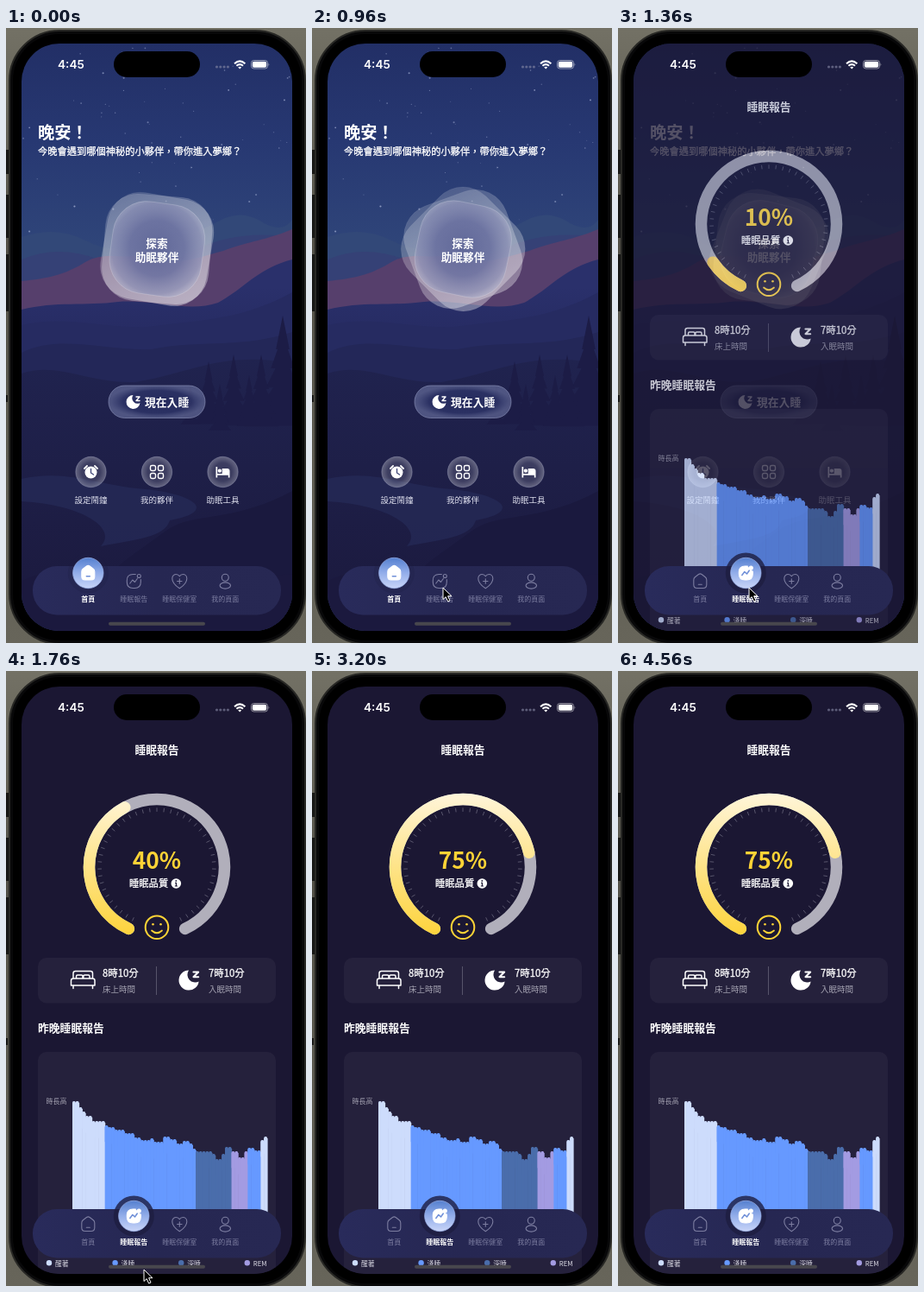
Write an HTML page that moves like this. It is 348 px wide and 712 px high and loops after 4.64 s.

```html
<!DOCTYPE html>
<html lang="zh-Hant">
<head>
<meta charset="utf-8">
<title>Sleep app</title>
<style>
html, body { margin: 0; width: 100%; height: 100%; overflow: hidden; background: #5c5a4f; }
svg { display: block; width: 348px; height: 712px; font-family: "Noto Sans CJK TC", "Noto Sans CJK JP", "Noto Sans", sans-serif; }
.line { fill: none; stroke-linecap: round; stroke-linejoin: round; }
.mid { stroke: #fff; stroke-width: .3; }
</style>
</head>
<body>
<svg viewBox="0 0 348 712" xmlns="http://www.w3.org/2000/svg">
<defs>
  <clipPath id="screen"><rect x="18" y="18" width="314" height="680" rx="44"/></clipPath>
  <linearGradient id="wall" x1="0" y1="0" x2="0" y2="1">
    <stop offset="0" stop-color="#737165"/><stop offset=".35" stop-color="#514f46"/><stop offset="1" stop-color="#67655a"/>
  </linearGradient>
  <linearGradient id="sky" gradientUnits="userSpaceOnUse" x1="0" y1="18" x2="0" y2="300">
    <stop offset="0" stop-color="#222f66"/><stop offset=".4" stop-color="#273872"/><stop offset="1" stop-color="#324a7c"/>
  </linearGradient>
  <linearGradient id="hill" gradientUnits="userSpaceOnUse" x1="0" y1="300" x2="0" y2="470">
    <stop offset="0" stop-color="#2a306b"/><stop offset="1" stop-color="#1f2252"/>
  </linearGradient>
  <linearGradient id="valley" gradientUnits="userSpaceOnUse" x1="0" y1="380" x2="0" y2="698">
    <stop offset="0" stop-color="#20234f"/><stop offset="1" stop-color="#1b193d"/>
  </linearGradient>
  <linearGradient id="petal" gradientUnits="userSpaceOnUse" x1="140" y1="188" x2="205" y2="326">
    <stop offset="0" stop-color="#fff" stop-opacity=".16"/><stop offset="1" stop-color="#fff" stop-opacity=".36"/>
  </linearGradient>
  <radialGradient id="core" gradientUnits="userSpaceOnUse" cx="175" cy="255" r="64">
    <stop offset="0" stop-color="#5d6496" stop-opacity=".92"/><stop offset=".5" stop-color="#696f9f" stop-opacity=".85"/>
    <stop offset=".82" stop-color="#8a8eb4" stop-opacity=".7"/><stop offset="1" stop-color="#bfc1d6" stop-opacity=".5"/>
  </radialGradient>
  <radialGradient id="glass">
    <stop offset="0" stop-color="#fff" stop-opacity=".1"/><stop offset=".6" stop-color="#fff" stop-opacity=".14"/><stop offset="1" stop-color="#fff" stop-opacity=".32"/>
  </radialGradient>
  <radialGradient id="pill">
    <stop offset="0" stop-color="#252b5f" stop-opacity=".85"/><stop offset=".7" stop-color="#2e3569" stop-opacity=".8"/><stop offset="1" stop-color="#69719f" stop-opacity=".65"/>
  </radialGradient>
  <linearGradient id="orb" x1="0" y1="0" x2="0" y2="1">
    <stop offset="0" stop-color="#5580d0"/><stop offset=".5" stop-color="#93aeea"/><stop offset="1" stop-color="#c9d5f8"/>
  </linearGradient>
  <linearGradient id="gold" gradientUnits="userSpaceOnUse" x1="0" y1="142" x2="0" y2="306">
    <stop offset="0" stop-color="#fff5d9"/><stop offset="1" stop-color="#fdd33c"/>
  </linearGradient>
  <linearGradient id="bar" x1="0" y1="0" x2="1" y2="0">
    <stop offset="0" stop-color="#292b5b"/><stop offset=".5" stop-color="#262752"/><stop offset="1" stop-color="#272853"/>
  </linearGradient>
  <path id="moon" d="M0 -8A8 8 0 1 0 8 1A6.2 6.2 0 0 1 0 -8Z"/>
  <path id="zed" class="line" d="M0 0H4L0 4.5H4"/>
</defs>

<rect width="348" height="712" fill="url(#wall)"/>
<g fill="#171715"><rect y="141" width="4" height="28"/><rect y="193" width="4" height="50"/><rect y="262" width="4" height="66"/><rect y="425" width="2" height="8"/></g>
<rect x="4" y="3" width="343" height="710" rx="58" fill="#080809" stroke="#282825" stroke-width="2"/>
<rect x="8" y="7" width="335" height="702" rx="54"/>

<g clip-path="url(#screen)">
  <g id="home">
    <rect x="18" y="18" width="314" height="680" fill="url(#sky)"/>
    <g id="stars" fill="#cdd6f4"></g>
    <path d="M18 242Q58 228 92 246T160 248Q210 244 246 224Q272 209 296 224T332 222V330H18Z" fill="#324878"/>
    <path d="M18 268Q60 250 108 268T205 264Q260 232 332 242V340H18Z" fill="#354176"/>
    <path d="M18 293C48 290 68 286 92 271C112 260 128 266 150 264C188 279 222 266 252 258C280 247 298 247 332 233V290L250 330L18 330Z" fill="#563f6c"/>
    <path d="M18 326C58 316 92 322 130 317C172 314 212 330 246 318C276 302 292 278 332 268V480H18Z" fill="url(#hill)"/>
    <path d="M18 344C70 332 110 348 165 346C220 338 270 340 332 306V480H18Z" fill="#262b61"/>
    <path d="M18 376C60 354 116 374 168 372C226 360 270 372 332 352V520H18Z" fill="#232758"/>
    <path d="M18 400C60 386 96 412 150 410C220 398 250 374 332 388V698H18Z" fill="url(#valley)"/>
    <path d="M18 522C70 510 108 530 162 534C220 540 246 560 190 570C184 590 150 592 110 600C130 580 90 552 18 548Z" fill="#272d5c" opacity=".6"/>
    <g id="trees" fill="#1c1c46"></g>
    <path d="M186 582C214 560 262 574 332 536V698H60C100 640 144 612 186 582Z" fill="#1a193e"/>
    <path d="M18 640C80 612 130 650 332 632V698H18Z" fill="#1b193e"/>
    <g fill="#fff">
      <text x="37" y="128" font-size="19.3" font-weight="700">晚安！</text>
      <text class="mid" x="37" y="146.5" font-size="11.25">今晚會遇到哪個神秘的小夥伴，帶你進入夢鄉？</text>
    </g>
    <g id="blob"></g>
    <g fill="#fff" font-size="12.7" font-weight="700" text-anchor="middle"><text x="175" y="253.5">探索</text><text x="175" y="269.7">助眠夥伴</text></g>
    <rect x="119" y="414" width="112" height="37.5" rx="18.7" fill="url(#pill)" stroke="#8f97bd" stroke-opacity=".6"/>
    <use href="#moon" x="147.5" y="433" fill="#fff"/>
    <use href="#zed" x="151" y="427" stroke="#fff" stroke-width="1.4"/>
    <text x="161" y="437.8" font-size="12.8" font-weight="700" fill="#fff">現在入睡</text>
    <g id="tools"></g>
    <g transform="translate(98.5 514.5)">
      <circle r="7" fill="#fff"/><path class="line" d="M0 -4V.5L3 2.5" stroke="#454b7c" stroke-width="1.4"/>
      <path class="line" d="M-7.5 -4.5L-4.5 -7.5M7.5 -4.5L4.5 -7.5" stroke="#fff" stroke-width="1.8"/>
    </g>
    <g transform="translate(175 514)" class="line" stroke="#fff" stroke-width="1.4">
      <rect x="-7.5" y="-7.5" width="6" height="6" rx="1.7"/><rect x="1.5" y="-7.5" width="6" height="6" rx="1.7"/>
      <rect x="-7.5" y="1.5" width="6" height="6" rx="1.7"/><rect x="1.5" y="1.5" width="6" height="6" rx="1.7"/>
    </g>
    <path transform="translate(251.5 514)" d="M-8 -6H-6.3V2H-.8V-4H5Q8 -4 8 -1V6.5H6.3V3.8H-6.3V6.5H-8ZM-3.6 -3.6A2.2 2.2 0 1 1 -3.6 .8A2.2 2.2 0 1 1 -3.6 -3.6Z" fill="#fff"/>
  </g>

  <g id="report">
    <rect x="18" y="18" width="314" height="680" fill="#1b1733"/>
    <text x="175" y="96.3" font-size="12.8" font-weight="700" fill="#fff" text-anchor="middle">睡眠報告</text>
    <path id="track" class="line" stroke="#b1afbb" stroke-width="13.5"/>
    <path id="arc" class="line" stroke="url(#gold)" stroke-width="13.5"/>
    <path id="ticks" class="line" stroke="#69667c" stroke-width=".8"/>
    <text id="pct" x="175" y="229" font-size="26.3" font-weight="700" fill="#fdd336" text-anchor="middle"></text>
    <text class="mid" x="143" y="250.3" font-size="11.3" fill="#fff">睡眠品質</text>
    <circle cx="197.3" cy="246" r="5.8" fill="#fff"/>
    <path d="M196 244.8H198V248.6H199V249.6H195.8V248.6H196.8V245.8H196Z" fill="#1b1733"/><circle cx="197.3" cy="242.9" r=".9" fill="#1b1733"/>
    <g class="line" stroke="#fdd336" stroke-width="2"><circle cx="175" cy="296.7" r="13.3"/><path d="M169 300.5Q175 306 181 300.5" stroke-width="1.7"/></g>
    <circle cx="170.5" cy="293.3" r="1.3" fill="#fdd336"/><circle cx="179.5" cy="293.3" r="1.3" fill="#fdd336"/>

    <g fill="#25213c"><rect x="37" y="332" width="276" height="52.5" rx="10"/><rect x="37" y="441" width="276" height="280" rx="10"/></g>
    <path d="M174.5 342V375" stroke="#57546b"/>
    <path class="line" d="M78 356V350Q78 347.5 80.5 347.5H98Q100.5 347.5 100.5 350V356M81.5 356V353.5Q81.5 352 83 352H87.5Q89 352 89 353.5V356M89.8 356V353.5Q89.8 352 91.3 352H95.5Q97 352 97 353.5V356M75.5 364V358.5Q75.5 356 78 356H100.5Q103 356 103 358.5V364ZM78 364V367.5M100.5 364V367.5" stroke="#fff" stroke-width="1.5"/>
    <use href="#moon" transform="translate(212 358) scale(1.45)" fill="#fff"/>
    <use href="#zed" transform="translate(217.5 348.5) scale(1.4 1.25)" stroke="#fff" stroke-width="1.6"/>
    <g class="mid" fill="#fff" font-size="11.4"><text x="112" y="354.3">8時10分</text><text x="235" y="354.3">7時10分</text></g>
    <g fill="#a5a3b2" font-size="9.5"><text x="112" y="372">床上時間</text><text x="235" y="372">入眠時間</text></g>
    <text x="37" y="418.3" font-size="12.8" font-weight="700" fill="#fff">昨晚睡眠報告</text>
    <text x="46.5" y="501.3" font-size="8" fill="#a5a3b2">時長高</text>
    <g id="chart"></g>
    <g id="legend" font-size="7.8" fill="#dddce6"></g>
  </g>
  <g id="homeTabs"></g>
  <g id="reportTabs"></g>
</g>

<rect x="119" y="687.8" width="112" height="4" rx="2" fill="#48474d"/>
<rect x="125" y="27" width="100" height="30" rx="15" fill="#000"/>
<g fill="#fff">
  <text x="60" y="46.5" font-family="Inter, Roboto, sans-serif" font-size="13.6" font-weight="600">4:45</text>
  <g fill="#8a8ca8" opacity=".6"><circle cx="244.5" cy="45" r="1.6"/><circle cx="248.8" cy="45" r="1.6"/><circle cx="253.1" cy="45" r="1.6"/><circle cx="257.4" cy="45" r="1.6"/></g>
  <g fill="none" stroke="#fff" stroke-width="2"><path d="M265 41.2Q271.2 35.6 277.4 41.2"/><path d="M267.4 43.8Q271.2 40.4 275 43.8"/></g>
  <path d="M269.2 45.5Q271.2 43.9 273.2 45.5L271.2 47.6Z"/>
  <rect x="284.5" y="37.5" width="19" height="9.5" rx="3" fill="none" stroke="#fff" stroke-opacity=".5"/>
  <rect x="285.8" y="38.8" width="16.4" height="6.9" rx="1.9"/><path d="M304.6 40.5Q306.2 42.2 304.6 44Z" opacity=".6"/>
</g>
<path id="cursor" d="M0 0V13.5L3.2 10.6L5.6 16L8 15L5.6 9.7H10Z" fill="#000" stroke="#fff" stroke-width="1"/>
</svg>
<script>
const LOOP = 4640, STEP = 80, TAP = 1200;
const $ = id => document.getElementById(id);
const add = (id, markup) => $(id).insertAdjacentHTML('beforeend', markup);
const show = (id, on) => $(id).setAttribute('visibility', on ? 'visible' : 'hidden');
const clamp = v => Math.min(1, Math.max(0, v));
const smooth = v => v * v * (3 - 2 * v);

function random(seed) {
  return () => (seed = (seed * 16807) % 2147483647) / 2147483647;
}

// Scenery
const rnd = random(42);
for (let i = 0; i < 64; i++) {
  const x = 20 + 310 * rnd(), y = 22 + 215 * Math.pow(rnd(), 1.1);
  add('stars', `<circle cx="${x}" cy="${y}" r="${0.4 + 0.7 * rnd()}" opacity="${0.2 + 0.4 * rnd()}"/>`);
}
function tree(x, top, height) {
  let d = '';
  for (let k = 0; k < 5; k++) {
    const y = top + height * k * 0.17, w = height * (0.06 + 0.045 * k);
    d += `M${x} ${y}L${x + w} ${y + height * 0.3}H${x - w}Z`;
  }
  add('trees', `<path d="${d}"/>`);
}
[[321, 333, 130], [296, 378, 85], [264, 378, 84], [235, 386, 74], [282, 402, 60], [214, 412, 48], [248, 412, 55]]
  .forEach(t => tree(...t));

// Home tools
['設定鬧鐘', '我的夥伴', '助眠工具'].forEach((label, i) => {
  const x = 98.5 + 76.5 * i;
  add('tools', `<circle cx="${x}" cy="514" r="17.7" fill="url(#glass)" stroke="#b5b9d4" stroke-opacity=".3"/>
    <text x="${x}" y="550" font-size="9.5" fill="#dfe0ee" text-anchor="middle">${label}</text>`);
});

// Tab bar
const icons = [
  { body: 'M-7.5 -1.5Q-7.5 -3.5 -6 -4.7L-1.8 -8Q0 -9.3 1.8 -8L6 -4.7Q7.5 -3.5 7.5 -1.5V4Q7.5 8 3.5 8H-3.5Q-7.5 8 -7.5 4Z', mark: 'M-2 3.7H2' },
  { body: 'M2 -8H-1Q-8 -8 -8 -1V1Q-8 8 -1 8H1Q8 8 8 1V-2', mark: 'M-4.5 2.5L-1.5 -1.5L1.2 1L4 -3', dot: true },
  { body: 'M0 8.3C-5 5 -8.5 1 -8.5 -3C-8.5 -6.5 -6 -8 -4 -8C-2 -8 -.7 -7 0 -5.7C.7 -7 2 -8 4 -8C6 -8 8.5 -6.5 8.5 -3C8.5 1 5 5 0 8.3Z', mark: 'M0 -2.7V2.7M-2.7 0H2.7' },
  { body: 'M-4 -4.2A4 4 0 1 1 4 -4.2A4 4 0 1 1 -4 -4.2ZM-6.2 5A6.2 3.6 0 1 1 6.2 5A6.2 3.6 0 1 1 -6.2 5Z', mark: '' }
];
const tabs = ['首頁', '睡眠報告', '睡眠保健室', '我的頁面'];
function tabBar(id, active, halo) {
  let s = '<rect x="31" y="623" width="288" height="56.5" rx="28" fill="url(#bar)"/>';
  tabs.forEach((label, i) => {
    const x = 95.3 + 53 * i, on = i === active, { body, mark, dot } = icons[i];
    const ink = on ? '#fff' : '#7c7da0';
    if (on) s += `<circle cx="${x}" cy="631" r="23.5" fill="#1d1d40" opacity="${halo}"/>
      <circle cx="${x}" cy="631" r="17.7" fill="url(#orb)" stroke="#9cb3ea" stroke-opacity=".7"/>`;
    s += `<g class="line" transform="translate(${x} ${on ? 631 : 640.5})" stroke="${ink}" stroke-width="1.1">
      <path d="${body}" fill="${on ? '#fff' : 'none'}"/><path d="${mark}" stroke="${on ? '#6f8fd8' : ink}" stroke-width="${on ? 1.5 : 1.1}"/>
      ${dot ? `<circle cx="6" cy="-6" r="2" fill="${on ? '#fff' : 'none'}"/>` : ''}</g>
      <text x="${x}" y="664" font-size="8" font-weight="${on ? 700 : 400}" fill="${ink}" text-anchor="middle">${label}</text>`;
  });
  add(id, s);
}
tabBar('homeTabs', 0, 0.25);
tabBar('reportTabs', 1, 0.8);

// Sleep chart: steps as [x, top]
const tops = [[77, 498], [84, 505], [88, 510], [93, 515], [98, 521], [112, 526], [116, 528], [124, 531], [137, 535], [147, 540], [155, 543], [166, 541], [172, 545], [181, 539], [189, 542], [196, 547], [204, 544], [211, 547], [214, 553], [221, 556], [237, 559], [242, 565], [249, 559], [254, 551], [261, 556], [269, 563], [276, 556], [281, 552], [287, 555], [293, 551], [295, 543], [299, 539]];
const phases = [[77, '#cddcfc'], [115, '#6699ff'], [219, '#4a6dab'], [261, '#a39be2'], [281, '#6699ff'], [295, '#cddcfc']];
const lookup = (list, x) => list.filter(p => p[0] <= x + 1).pop()[1];
const BARS = 60, BAR_W = 226 / BARS;
for (let i = 0; i < BARS; i++) {
  const x = 77 + i * BAR_W, y = lookup(tops, x), fill = lookup(phases, x);
  add('chart', `<rect x="${x}" y="${y}" width="${BAR_W}" height="20" rx="1.5" fill="${fill}"/>
    <rect x="${x}" y="${y + 2}" width="${BAR_W + 0.6}" height="${660 - y}" fill="${fill}"/>`);
}
['醒著', '淺睡', '深睡', 'REM'].forEach((label, i) => {
  const x = 50 + 76.6 * i;
  add('legend', `<circle cx="${x}" cy="685.3" r="3.2" fill="${phases[i][1]}"/><text x="${x + 7}" y="688.5">${label}</text>`);
});

// Gauge
const CX = 175, CY = 227, R = 78.5, START = 114.6, SWEEP = 310.8;
const polar = (deg, r) => {
  const a = deg * Math.PI / 180;
  return `${CX + r * Math.cos(a)} ${CY + r * Math.sin(a)}`;
};
const gauge = part => `M${polar(START, R)}A${R} ${R} 0 ${part * SWEEP > 180 ? 1 : 0} 1 ${polar(START + part * SWEEP, R)}`;
$('track').setAttribute('d', gauge(1));
let tickPath = '';
for (let i = 0; i <= 44; i++) {
  const a = START + SWEEP * i / 44;
  tickPath += `M${polar(a, 64.5)}L${polar(a, 68.3)}`;
}
$('ticks').setAttribute('d', tickPath);

// Rotated rounded square; its gradient stays fixed in the scene
function squircle(deg, side, r) {
  const a = deg * Math.PI / 180, h = side / 2, k = h - r;
  const at = (x, y) => `${175.3 + x * Math.cos(a) - y * Math.sin(a)} ${256 + x * Math.sin(a) + y * Math.cos(a)}`;
  const arc = `A${r} ${r} 0 0 1 `;
  return `M${at(-k, -h)}L${at(k, -h)}${arc}${at(h, -k)}L${at(h, k)}${arc}${at(k, h)}L${at(-k, h)}${arc}${at(-h, k)}L${at(-h, -k)}${arc}${at(-k, -h)}Z`;
}
const layers = [
  { from: 10, speed: 0.13, side: 124, r: 38 },
  { from: 5, speed: -0.12, side: 124, r: 38 },
  { from: 8, speed: 0.004, side: 107, r: 39, core: true }
];
for (const l of layers) {
  add('blob', l.core
    ? '<path fill="url(#core)" stroke="#fff" stroke-opacity=".18"/>'
    : '<path fill="url(#petal)" stroke="#fff" stroke-opacity=".06"/>');
  l.path = $('blob').lastElementChild;
}

// Pointer stops as [time, x, y]
const stops = [[240, 165, 714], [720, 152, 648], [1440, 152, 648], [1760, 160, 693], [2160, 163, 709], [2640, 163, 709], [2880, 164, 716]];
function pointer(t) {
  const i = stops.findIndex(s => s[0] > t);
  if (i < 1) return [165, 740];
  const [t0, x0, y0] = stops[i - 1], [t1, x1, y1] = stops[i];
  const u = smooth((t - t0) / (t1 - t0));
  return [x0 + (x1 - x0) * u, y0 + (y1 - y0) * u];
}

function draw(t) {
  for (const l of layers) l.path.setAttribute('d', squircle(l.from + l.speed * t, l.side, l.r));
  const fade = clamp((t - TAP) / 213);
  $('report').setAttribute('opacity', fade);
  show('home', fade < 1);
  show('homeTabs', t <= TAP);
  show('reportTabs', t > TAP);
  const left = 1 - clamp((t - 1252) / 1560);
  const score = 75 * (1 - left * left);
  $('arc').setAttribute('d', gauge(Math.max(score, 0.01) / 100));
  $('pct').textContent = Math.floor(score) + '%';
  $('cursor').setAttribute('transform', `translate(${pointer(t)})`);
}

const begin = performance.now();
function tick() {
  const t = (performance.now() - begin) % LOOP;
  draw(Math.floor(t / STEP) * STEP);
  requestAnimationFrame(tick);
}
tick();
</script>
</body>
</html>
```
